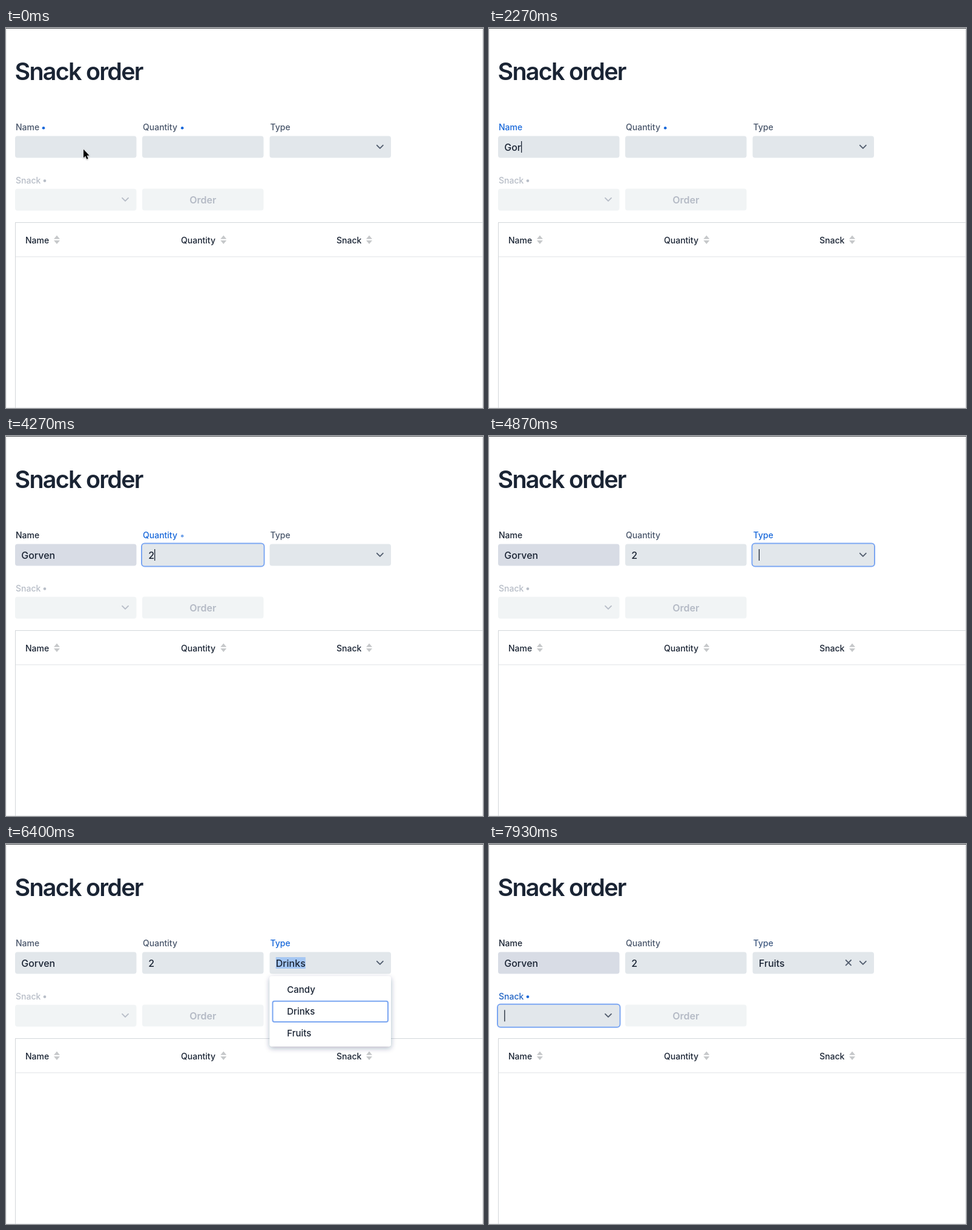
These frames come from a looping animation (788x628 px, 8000 ms). An HTML page:

```html
<!DOCTYPE html>
<html lang="en">
<head>
<meta charset="utf-8">
<title>Snack order</title>
<style>
  html, body { margin: 0; width: 100%; height: 100%; overflow: hidden; background: #fff; }
  svg { display: block; }
  text { font-family: Inter, "Open Sans", sans-serif; font-optical-sizing: none; white-space: pre; }
</style>
</head>
<body>
<svg id="stage" width="788" height="628" viewBox="0 0 788 628"></svg>
<script>
const LOOP = 8000;
const stage = document.getElementById('stage');
const ruler = document.createElement('canvas').getContext('2d');

const gray = [72, 85, 106], blue = [22, 103, 218], dark = [26, 36, 52], faded = [183, 189, 199];
const fieldFill = [226, 231, 235], hoverFill = [216, 220, 229], disabledFill = [241, 244, 245];
const ink = '#1a2434', ringColor = '#7ba6f1';
const PERSON = 'Gorven';

const rgb = c => `rgb(${c.map(Math.round)})`;

// Value of the latest [time, value] key.
const at = (t, keys) => keys.filter(k => k[0] <= t).pop()[1];

// Like at(), but blends from the previous value in four short steps.
function fade(t, keys) {
  const i = keys.filter(k => k[0] <= t).length - 1;
  const [start, value] = keys[i];
  if (!i) return value;
  const p = Math.min(1, (Math.floor((t - start + 5) / 66) + 2) / 5);
  return value.map((v, n) => keys[i - 1][1][n] * (1 - p) + v * p);
}

const text = (x, y, str, size, weight, fill, extra = '') =>
  `<text x="${x}" y="${y}" font-size="${size}" font-weight="${weight}" fill="${fill}" ${extra}>${str}</text>`;
const box = (x, y, w, h, fill, r = 0, extra = '') =>
  `<rect x="${x}" y="${y}" width="${w}" height="${h}" rx="${r}" fill="${fill}" ${extra}/>`;
const line = (d, color, width) =>
  `<path d="${d}" fill="none" stroke="${color}" stroke-width="${width}" stroke-linecap="round" stroke-linejoin="round"/>`;
const dot = (x, y, color, opacity = 1, r = 2.3) =>
  `<circle cx="${x}" cy="${y}" r="${r}" fill="${color}" opacity="${opacity}"/>`;
const chevron = (x, y, color) => line(`M${x - 5} ${y - 2.5}l5 5l5 -5`, color, 1.9);
const ring = (x, y, w, h, r) => box(x, y, w, h, 'none', r, `stroke="${ringColor}" stroke-width="2"`);

function textWidth(str) {
  ruler.font = '500 16px Inter, "Open Sans", sans-serif';
  return ruler.measureText(str).width;
}

function field(x, y, f) {
  let out = text(x + 1, y - 9.3, f.label, 14, 500, rgb(f.color)) + box(x, y, 200.5, 36, rgb(f.fill), 4);
  if (f.focused) out += ring(x - 1, y - 1, 202.5, 38, 5);
  const value = f.value || '', tx = x + 10.2;
  if (f.selected) out += box(tx, y + 8.5, textWidth(value), 19, '#a5c7f3');
  out += text(tx, y + 24, value, 16, 500, ink);
  if (f.caret) out += box(tx + textWidth(value), y + 8.5, 1.3, 19, ink);
  return out;
}

function header(x, label, iconX) {
  return text(x, 355.8, label, 14, 500, ink) +
    `<path d="M${iconX - 5} 348.8l5 -6l5 6zM${iconX - 5} 351l5 6l5 -6z" fill="#c6c8ca"/>`;
}

const page =
  `<defs><filter id="shadow" x="-20%" y="-60%" width="140%" height="260%">
    <feDropShadow dx="0" dy="3" stdDeviation="4" flood-color="#1a2f55" flood-opacity=".34"/></filter>
    <filter id="soft" x="-50%" y="-50%" width="200%" height="200%">
    <feDropShadow dx="0" dy="1" stdDeviation="1" flood-opacity=".35"/></filter></defs>` +
  box(0, 0, 788, 628, '#fff') + box(0, 0, 1, 628, '#ebecee') + box(0, 627, 788, 1, '#ebecee') +
  box(787, 0, 1, 628, '#dadcdf') + box(0, 0, 788, 1, '#46484c') +
  text(14.5, 85.8, 'Snack order', 39.5, 600, ink, 'letter-spacing="-1.75"') +
  box(225, 265.5, 200.5, 36, rgb(disabledFill), 4) +
  text(325.3, 289.8, 'Order', 16, 600, '#b4bac5', 'text-anchor="middle"') +
  box(15, 321, 773, 1, '#d3d7da') + box(15, 321, 1, 307, '#d3d7da') + box(16, 377.5, 772, 1, '#dfe2e5') +
  header(32, 'Name', 84) + header(289, 'Quantity', 359.3) + header(546, 'Snack', 600);

function dropdown(t) {
  if (t < 5270 || t >= 7330) return '';
  if (t >= 7270) return box(435.5, 216, 200.5, 10.5, '#fff', 4, 'filter="url(#soft)" opacity=".8"');
  const active = at(t, [[0, -1], [6070, 0], [6400, 1], [6870, 2]]);
  let out = box(435.5, 218.5, 200.5, 116, '#fff', 4, 'filter="url(#shadow)"');
  if (active >= 0) out += ring(440.5, 223.7 + 36 * active, 190.5, 34.3, 3);
  ['Candy', 'Drinks', 'Fruits'].forEach((item, i) => out += text(464.3, 246.3 + 36 * i, item, 15, 450, ink));
  return `<g opacity="${fade(t, [[0, [0]], [5270, [1]]])}">${out}</g>`;
}

function pointer(t) {
  if (t >= 1670) return '';
  if (t < 930) return `<path d="M128 200.5v14l3.2 -3l2.2 5.2l2.3 -1l-2.2 -5h4.2z" fill="#000"
    stroke="#fff" stroke-width="1" paint-order="stroke" filter="url(#soft)"/>`;
  const beam = 'M125.5 194.5q2.8 0 2.8 2v11.5q0 2 -2.8 2M131.1 194.5q-2.8 0 -2.8 2v11.5q0 2 2.8 2M126.8 203.5h3';
  return line(beam, '#fff', 2.6) + line(beam, '#111', 1.2);
}

function render(t) {
  const focus = at(t, [[0, ''], [930, 'name'], [2800, 'quantity'], [4670, 'type'], [7800, 'snack']]);
  const caretOn = at(t, [[0, 0], [930, 1], [1470, 0], [1670, 1], [3270, 0], [3800, 1],
    [5270, 0], [5730, 1], [6070, 0], [7270, 1]]);
  const typed = at(t, [[0, 0], [1670, 1], [2000, 2], [2270, 3], [2400, 5], [2530, 6]]);
  const caret = name => caretOn && focus === name;
  const snackColor = fade(t, [[0, faded], [7400, gray], [7800, blue]]);
  const arrowColor = [82, 93, 110];
  const committed = t >= 7270;

  return page +
    field(15, 178.5, {
      label: 'Name', value: PERSON.slice(0, typed), caret: caret('name'),
      color: fade(t, [[0, gray], [930, blue], [2800, dark], [5270, gray], [7330, dark]]),
      fill: fade(t, [[0, fieldFill], [2800, hoverFill], [5270, fieldFill], [7330, hoverFill]])
    }) +
    dot(62, 165.2, rgb(blue), fade(t, [[0, [1]], [1670, [0]]])) +
    field(225, 178.5, {
      label: 'Quantity', value: t >= 4270 ? '2' : '', caret: caret('quantity'),
      focused: focus === 'quantity', fill: fieldFill,
      color: fade(t, [[0, gray], [2800, blue], [4670, gray]])
    }) +
    dot(291.2, 165.2, rgb(blue), fade(t, [[0, [1]], [4270, [0]]])) +
    field(435.5, 178.5, {
      label: 'Type', value: at(t, [[0, ''], [6070, 'Candy'], [6400, 'Drinks'], [6870, 'Fruits']]),
      caret: caret('type'), selected: t >= 6070 && !committed,
      focused: focus === 'type' && (t < 5270 || committed), fill: fieldFill,
      color: fade(t, [[0, gray], [4670, blue], [7800, gray]])
    }) +
    chevron(617.8, 196.3, rgb(arrowColor)) +
    (committed ? line('M589.6 192l8.4 8.4M598 192l-8.4 8.4', rgb(arrowColor), 1.8) : '') +
    field(15, 265.8, {
      label: 'Snack', caret: caret('snack'), focused: focus === 'snack', color: snackColor,
      fill: fade(t, [[0, disabledFill], [7400, fieldFill]])
    }) +
    dot(64, 252.5, rgb(fade(t, [[0, faded], [7400, blue]]))) +
    chevron(197, 283.4, rgb(fade(t, [[0, faded], [7400, arrowColor]]))) +
    dropdown(t) + pointer(t);
}

let shown = '';
function tick() {
  const next = render(performance.now() % LOOP);
  if (next !== shown) stage.innerHTML = shown = next;
  requestAnimationFrame(tick);
}
tick();
</script>
</body>
</html>
```
